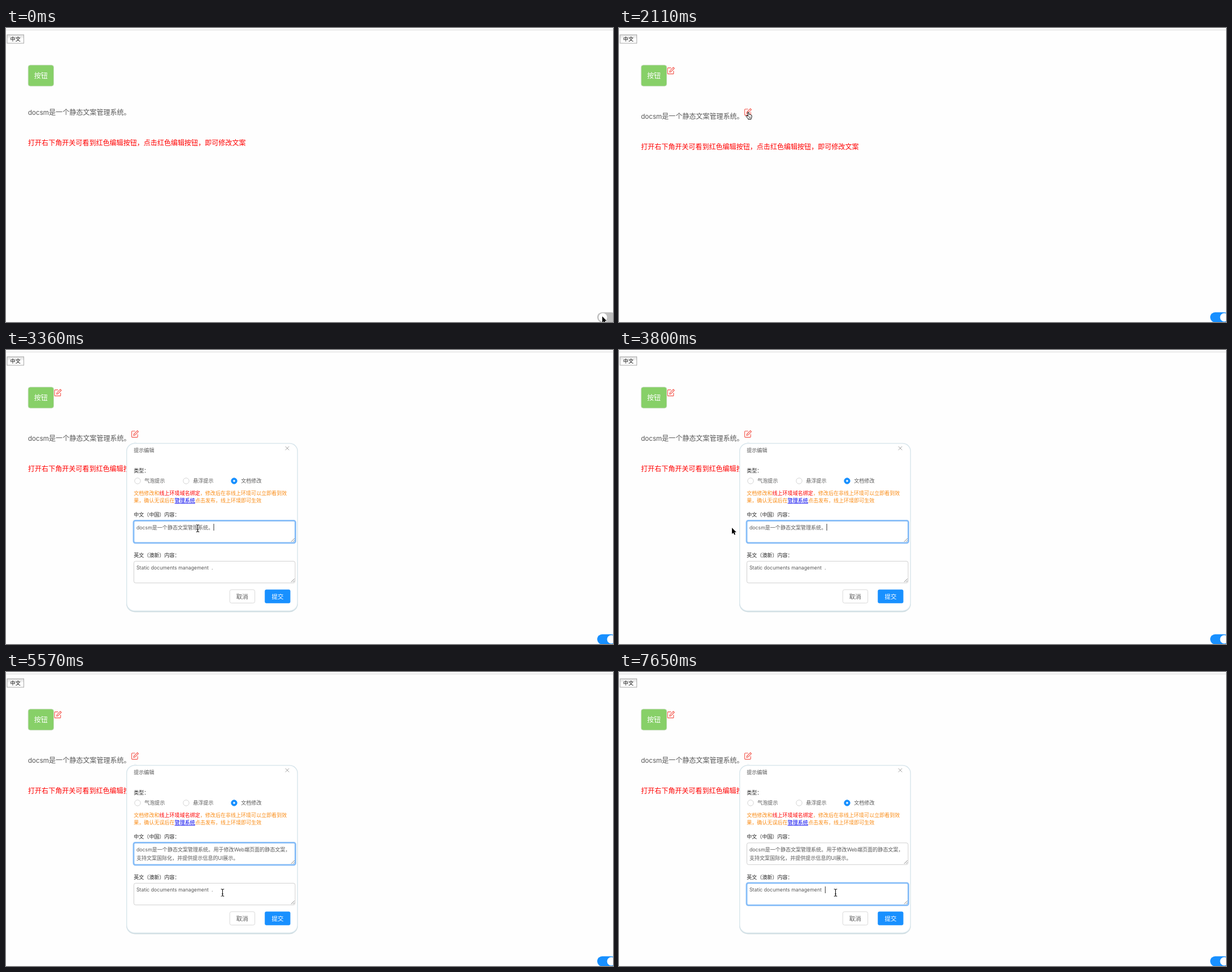
Write an HTML page that moves like this. It is 1075x521 px and loops after 8000 ms.

```html
<!DOCTYPE html>
<html lang="zh-CN">
<head>
<meta charset="utf-8">
<title>docsm</title>
<style>
html, body { margin: 0; width: 100%; height: 100%; overflow: hidden; background: #fefefe; }
svg { display: block; }
text { font-family: "Noto Sans CJK SC", "Noto Sans CJK", sans-serif; white-space: pre; }
.latin { font-family: Inter, sans-serif; font-size: .965em; }
</style>
</head>
<body>
<svg id="stage" width="1075" height="521" viewBox="0 0 1075 521">
  <defs>
    <linearGradient id="shade" x2="0" y2="1">
      <stop offset="0" stop-color="#e2e2e2"/><stop offset=".4" stop-color="#f3f3f3"/><stop offset=".45" stop-color="#fff"/>
    </linearGradient>
    <filter id="soft" x="-20%" y="-80%" width="140%" height="260%">
      <feDropShadow dx="0" dy="3" stdDeviation="5" flood-opacity=".3"/>
    </filter>
    <g id="edit" fill="none" stroke="#f4564c" stroke-width="1.1" stroke-linejoin="round">
      <path d="M6.7 1.6H1.6Q.6 1.6 .6 2.6V11.4Q.6 12.4 1.6 12.4H10.2Q11.2 12.4 11.2 11.4V7"/>
      <path d="M4 9.3L4.6 6.8 10.7 .7 12.5 2.5 6.4 8.6Z"/>
    </g>
    <g id="arrow">
      <path d="M0 0V11L2.5 8.7 4.2 12.6 6.1 11.8 4.5 8H7.8Z" stroke="#fff" stroke-width="1.2" paint-order="stroke"/>
    </g>
    <g id="hand">
      <path d="M-1.2 .9Q-1.2 0 -.3 0 .6 0 .8 .9L1.5 4.2Q2.4 3.6 3 4.6 4 4 4.5 5.1 5.8 4.7 6 6.2L6.1 8.5Q6 10 5 11.2V12.7H-.4V11.6L-3.8 7.7Q-4.5 6.5 -3.3 6.2 -2.4 6 -.3 7.6Z" fill="#fff" stroke="#000"/>
      <path d="M1.6 8V10.6M3.4 8V10.6" stroke="#000" stroke-width=".7"/>
    </g>
    <g id="beam" fill="none">
      <path id="bar" d="M-2.8 -6.3Q0 -6.3 0 -4.7 0 -6.3 2.8 -6.3M0 -5V5M-2.8 6.3Q0 6.3 0 4.7 0 6.3 2.8 6.3M-1.4 2.2H1.4" stroke="#fff" stroke-width="2.4"/>
      <use href="#bar" style="stroke:#111"/>
      <path d="M-2.8 -6.3Q0 -6.3 0 -4.7 0 -6.3 2.8 -6.3M0 -5V5M-2.8 6.3Q0 6.3 0 4.7 0 6.3 2.8 6.3M-1.4 2.2H1.4" stroke="#111" stroke-width="1.1"/>
    </g>
  </defs>
</svg>
<script>
const LOOP = 8000, GREY = '#595959', DARK = '#262626', BLUE = '#1890ff', ORANGE = '#fa8c16';
const stage = document.getElementById('stage');

const latin = s => s.replace(/[ -~]+/g, m => `<tspan class="latin">${m}</tspan>`);
// y is the middle of the line
const text = (x, y, s, fill = GREY, size = 9.04, extra = '') =>
  `<text x="${x}" y="${y + size * .37}" font-size="${size}" fill="${fill}" ${extra}>${latin(s)}</text>`;
const box = (x, y, w, h, r, fill, stroke = 'none', extra = '') =>
  `<rect x="${x}" y="${y}" width="${w}" height="${h}" rx="${r}" fill="${fill}" stroke="${stroke}" ${extra}/>`;
const radio = (x, label, on) =>
  `<circle cx="${x}" cy="232" r="5.2" fill="${on ? BLUE : '#fff'}" stroke="${on ? BLUE : '#d0d0d0'}" stroke-width=".9"/>` +
  (on ? `<circle cx="${x}" cy="232" r="1.8" fill="#fff"/>` : '') + text(x + 12.3, 232, label);
const area = (id, y) =>
  box(226.5, y, 285.5, 38.5, 3, '#fff', '#d0d0d0') +
  box(226, y - .5, 286.5, 39.5, 3, 'none', '#86bdf8', `stroke-width="2.8" id="${id}"`) +
  `<path d="M505 ${y + 37}l6 -6M508.5 ${y + 37}l2.5 -2.5" stroke="#777" stroke-width=".9"/>`;

const first = 'docsm是一个静态文案管理系统。';
stage.insertAdjacentHTML('beforeend', `
  <rect y="3" width="1075" height="1" fill="#d8d8d8"/>
  ${box(2, 12, 29.5, 15, 0, 'url(#shade)', '#a8a8a8')}
  ${text(7.6, 19.6, '中文', '#000')}
  ${box(39.2, 65.7, 45.3, 37.4, 4, '#87d068', '#cfdcca', 'stroke-width=".8"')}
  ${text(49.8, 84.6, '按钮', '#fff', 12.06, 'font-weight="500"')}
  <g id="copy">
    ${text(39, 149.8, first, GREY, 12.06)}
    ${text(39, 203.8, '打开右下角开关可看到红色编辑按钮，点击红色编辑按钮，即可修改文案', '#f00', 12.06)}
  </g>
  <g id="icons"><use href="#edit" x="85.5" y="69"/><use href="#edit" x="222" y="142.2"/></g>
  <rect id="track" x="1047" y="503.7" width="33.2" height="17.8" rx="8.9"/>
  <circle id="knob" cy="512.7" r="7.5" fill="#fff"/>
  <g id="dialog">
    <rect x="213" y="166.5" width="304" height="298" rx="15" fill="#ccd9de"/>
    ${box(213.7, 165.5, 302.6, 297, 14, '#fff', '#d9e6ec', 'stroke-width="1.5"')}
    <path d="M226.5 165L228.7 163.3 231 165" fill="#fff" stroke="#d9e6ec" stroke-width=".8"/>
    ${text(226.3, 177.3, '提示编辑')}
    <path d="M494.8 170.8l6.6 6.6m0 -6.6l-6.6 6.6" stroke="#999" stroke-width=".9"/>
    ${text(226.3, 213.5, '类型：', DARK)}
    ${radio(233, '气泡提示')}${radio(319, '悬浮提示')}${radio(404, '文档修改', true)}
    ${text(226.3, 253.3, '文档修改和', ORANGE)}
    ${text(271.5, 253.3, '线上环境域名绑定', '#f00')}
    ${text(343.8, 253.3, '，修改后在非线上环境可以立即看到效', ORANGE)}
    ${text(226.3, 267, '果，确认无误后在', ORANGE)}
    ${text(298.7, 267, '管理系统', '#00e', 9.04, 'text-decoration="underline"')}
    ${text(334.9, 267, '点击发布，线上环境即可生效', ORANGE)}
    ${text(226.3, 291.5, '中文（中国）内容：', DARK)}
    ${area('ring1', 302.8)}
    ${text(231, 314.4, first)}
    <g id="added">
      ${text(367.5, 314.4, '用于修改Web端页面的静态文案，')}
      ${text(231, 329.3, '支持文案国际化，并提供提示信息的UI展示。')}
    </g>
    ${text(226.3, 363.2, '英文（澳新）内容：', DARK)}
    ${area('ring2', 374.3)}
    <g id="english">${text(231, 386, 'Static documents management')}</g>
    <g id="dot">${text(364, 386, '.')}</g>
    <rect id="caret" width="1" height="12" fill="#333"/>
    ${box(396.3, 424.8, 44.4, 23.6, 3, '#fff', '#d9d9d9')}
    ${text(407.8, 437, '取消', GREY, 10.55)}
    ${box(458.3, 424.5, 45.3, 24.2, 3, BLUE)}
    ${text(470.5, 437, '提交', '#fff', 10.55, 'font-weight="500"')}
  </g>
  <g id="picker">
    ${box(364, 394, 211, 22, 3, '#fff', '#ddd', 'stroke-width=".6" filter="url(#soft)"')}
    ${['我', '为', '问', '无', '位', '完'].map((c, i) => text(371 + i * 34, 405, `${i + 1} ${c}`, '#333')).join('')}
  </g>
  <use id="pointer"/>`);

const $ = id => document.getElementById(id);
const show = (id, on) => $(id).setAttribute('visibility', on ? 'visible' : 'hidden');
const set = (id, attrs) => { for (const k in attrs) $(id).setAttribute(k, attrs[k]); };

// the screen refreshes only at these moments: [first, last, count]
const ticks = [[0, 0, 1], [450, 450, 1], [780, 1810, 8], [1960, 2110, 2], [2410, 3360, 7], [3510, 3800, 3],
  [4100, 4100, 1], [4540, 4540, 1], [4840, 5720, 7], [6170, 6170, 1], [6470, 6470, 1], [6910, 6910, 1],
  [7210, 7350, 2], [7650, 7650, 1]]
  .flatMap(([a, b, n]) => Array.from({ length: n }, (_, i) => a + (n > 1 ? (b - a) * i / (n - 1) : 0)));

// pointer path: [time, x, y]
const path = [[0, 1056, 511], [930, 1055.5, 511], [1810, 237, 145], [1960, 230, 149], [2110, 229, 149],
  [2560, 229, 149], [3050, 339.5, 316], [3360, 339.5, 316], [3800, 200, 315], [4100, 201, 316],
  [4690, 201, 316], [5430, 383.5, 391], [LOOP, 383.5, 391]];

function pointerAt(t) {
  const i = path.findIndex(p => p[0] > t), [t0, x0, y0] = path[i - 1], [t1, x1, y1] = path[i];
  const u = (t - t0) / (t1 - t0), e = u * u * (3 - 2 * u);
  return [x0 + (x1 - x0) * e, y0 + (y1 - y0) * e];
}

function pointerKind(t, x, y) {
  const inArea = x > 226 && x < 512 && (y > 303 && y < 341 || y > 374 && y < 413);
  if (t >= 2410 && inArea) return 'beam';
  return t >= 450 && t < 780 || t >= 1960 && t < 2600 ? 'hand' : 'arrow';
}

// caret place, or null while blinked off
function caretAt(t) {
  if (t < 3200 || t >= 3510 && t < 3800) return null;
  if (t < 4540) return [367.5, 308];
  if (t < 4840) return [411.3, 323];
  if (t < 5560 || t >= 6170 && t < 6470 || t >= 6910 && t < 7210) return null;
  return t < 6170 ? [367, 380] : [364.8, 380];
}

function draw(now) {
  const time = now % LOOP, t = ticks.filter(k => k <= time).pop();
  const on = t >= 780, slide = Math.min(1, Math.max(0, (t - 700) / 200));
  const mix = (a, b) => Math.round(a + (b - a) * slide);
  set('copy', { transform: `translate(0 ${on ? 6.8 : 0})` });
  show('icons', on);
  set('track', { fill: `rgb(${mix(191, 24)},${mix(191, 144)},${mix(191, 255)})` });
  set('knob', { cx: 1057 + 15 * slide });

  const open = t >= 2410, part = (id, yes) => show(id, open && yes);
  show('dialog', open);
  part('ring1', t >= 3200 && t < 5560);
  part('ring2', t >= 5560);
  part('added', t >= 4540);
  part('dot', t < 6170);
  part('picker', t >= 7210 && t < 7650);
  const caret = caretAt(t);
  part('caret', caret);
  if (caret) set('caret', { x: caret[0], y: caret[1] });

  const [x, y] = pointerAt(t);
  set('pointer', { href: '#' + pointerKind(t, x, y), x, y });
}

const start = performance.now();
(function frame() {
  draw(performance.now() - start);
  requestAnimationFrame(frame);
})();
</script>
</body>
</html>
```
